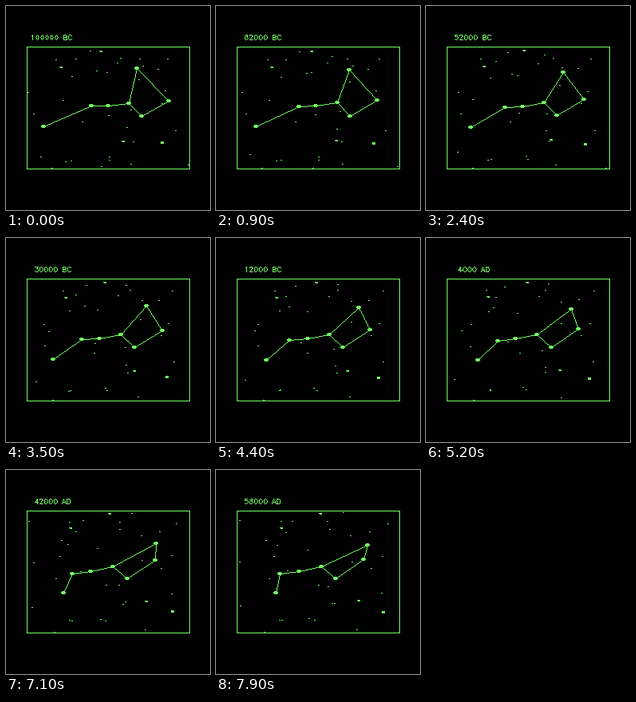
Recreate the animation shown at these times as a matplotlib script. Size 256 by 256 pixels, loop 8 s.

```python
import matplotlib.pyplot as plt
import numpy as np
from matplotlib.animation import FuncAnimation
from matplotlib.colors import ListedColormap

SIZE, DPI = 256, 100
FRAMES, STEP_MS = 80, 100
GREEN = "#70ff60"
LEFT, TOP, RIGHT, BOTTOM = 26, 51, 230, 204

# Key stars of the Big Dipper: (x, y) at the start and drift over the loop.
DIPPER = [
    ((47, 151), (28, 3)),
    ((107, 125), (-26.5, 5.5)),
    ((128, 125), (-24, 2)),
    ((154.5, 121.5), (-23, -0.5)),
    ((164.5, 78), (26, 16)),
    ((204, 119), (-19, -7)),
    ((170, 138), (-20, -2)),
]
PATH = [0, 1, 2, 3, 4, 5, 6, 3]

# A few brighter neighbours.
LARGE = [((196, 171), (14, 7))]
MEDIUM = [((119, 57), (12, -2)), ((69, 77), (13, -4)), ((147, 170), (32, -6))]


def faint_field(count=42, margin=12, seed=7):
    """Scatter stars around the window; most drift slowly, a few run fast."""
    rng = np.random.default_rng(seed)
    start = rng.uniform((LEFT - margin, TOP - margin),
                        (RIGHT + margin, BOTTOM + margin), (count, 2))
    return list(zip(start, rng.laplace(0, (14, 8), (count, 2))))


FAINT = faint_field()


def arc(cx, cy, rx, ry, start, end):
    a = np.radians(np.linspace(start, end, 9))
    return list(zip(cx + rx * np.cos(a), cy + ry * np.sin(a)))


SIX = arc(11, 10.5, 8, 10.5, 50, 180) + arc(10, 6.5, 7, 6.5, 180, -180)

# Stroke font: advance width and pen path, 21 units tall.
GLYPHS = {
    " ": (16, []),
    "0": (20, arc(10, 10.5, 7, 10.5, 0, 360)),
    "1": (20, [(6, 17), (8, 18), (11, 21), (11, 0)]),
    "2": (20, arc(10, 15, 6, 6, 170, -30) + [(3, 0), (17, 0)]),
    "3": (20, [(5, 21), (16, 21), (10, 13)] + arc(10, 6.5, 7, 6.5, 90, -150)),
    "4": (20, [(13, 0), (13, 21), (3, 7), (18, 7)]),
    "5": (20, [(15, 21), (5, 21), (4, 12)] + arc(10, 7, 7, 7, 120, -150)),
    "6": (20, SIX),
    "7": (20, [(3, 21), (17, 21), (7, 0)]),
    "8": (20, arc(10, 16.5, 5.5, 4.5, 270, -90) + arc(10, 6, 7, 6, 90, -270)),
    "9": (20, [(20 - x, 21 - y) for x, y in SIX]),
    "A": (18, [(1, 0), (9, 21), (17, 0), (14, 7), (4, 7)]),
    "B": (21, [(4, 0), (4, 21)] + arc(12, 16, 5, 5, 90, -90) + [(4, 11)]
          + arc(12, 5.5, 6, 5.5, 90, -90) + [(4, 0)]),
    "C": (21, arc(11, 10.5, 8, 10.5, 45, 315)),
    "D": (21, [(4, 0), (4, 21)] + arc(9, 10.5, 9, 10.5, 90, -90) + [(4, 0)]),
}


def stroke(canvas, points):
    """Draw a polyline one pixel wide, without smoothing."""
    pts = np.rint(points).astype(int)
    for a, b in zip(pts, pts[1:]):
        steps = np.linspace(a, b, abs(b - a).max() + 1)
        x, y = np.rint(steps).astype(int).T
        canvas[y, x] = 1


def write(canvas, text, x, y, scale=0.3):
    for ch in text:
        width, pen = GLYPHS[ch]
        if pen:
            stroke(canvas, [(x + px * scale, y - py * scale) for px, py in pen])
        x += width * scale


def place(stars, frame):
    k = frame / (FRAMES - 1)
    return [np.add(start, np.multiply(drift, k)) for start, drift in stars]


def dots(canvas, points, rows):
    """Draw each dot as centred pixel rows of the given widths."""
    for x, y in np.rint(points).astype(int):
        for i, w in enumerate(rows, y - len(rows) // 2):
            x0 = x - w // 2
            if 0 <= i < SIZE:
                canvas[i, max(x0, 0):max(x0 + w, 0)] = 1


def paint(frame):
    sky = np.zeros((SIZE, SIZE))
    main = place(DIPPER, frame)
    stroke(sky, [main[i] for i in PATH])
    dots(sky, main, (4, 6, 6, 4))
    dots(sky, place(LARGE, frame), (4, 4, 4))
    dots(sky, place(MEDIUM, frame), (4, 3))
    dots(sky, place(FAINT, frame), (2,))

    canvas = np.zeros_like(sky)
    window = np.s_[TOP:BOTTOM + 1, LEFT:RIGHT + 1]
    canvas[window] = sky[window]
    stroke(canvas, [(LEFT, TOP), (RIGHT, TOP), (RIGHT, BOTTOM),
                    (LEFT, BOTTOM), (LEFT, TOP)])

    year = -100000 + 2000 * frame
    era = "BC" if year < 0 else "AD"
    write(canvas, f"{abs(year):6d} {era}", 30, 42)
    return canvas


fig = plt.figure(figsize=(SIZE / DPI, SIZE / DPI), dpi=DPI, facecolor="black")
ax = fig.add_axes([0, 0, 1, 1])
ax.axis("off")
screen = ax.imshow(paint(0), cmap=ListedColormap(["black", GREEN]),
                   vmin=0, vmax=1, interpolation="nearest", aspect="auto")


def update(frame):
    screen.set_data(paint(frame))
    return (screen,)


anim = FuncAnimation(fig, update, frames=FRAMES, interval=STEP_MS,
                     repeat=True, repeat_delay=0, blit=False)
plt.show()
```
